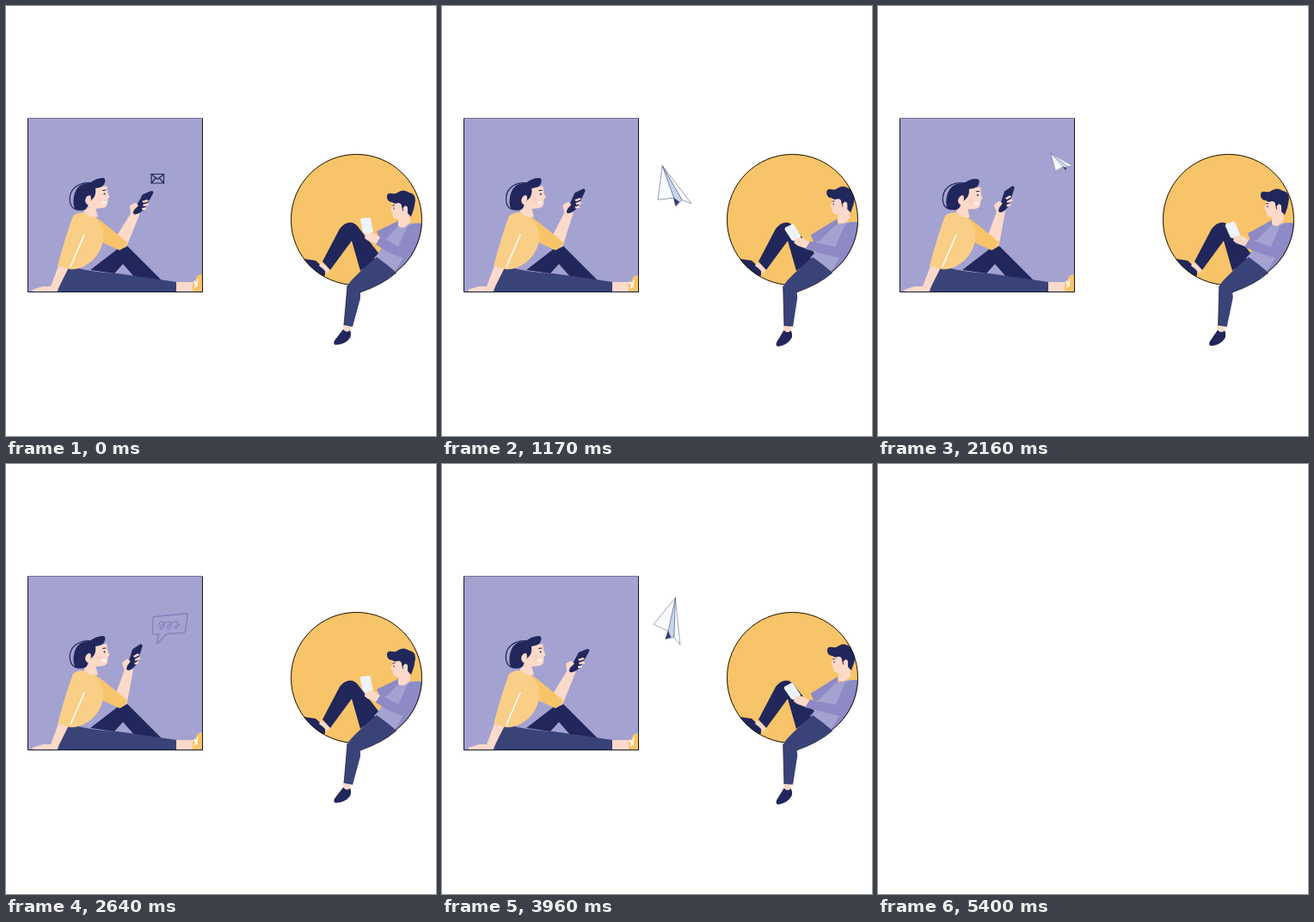
An HTML page for the animation above (5.43 s loop, 500x500 px).

```html
<!DOCTYPE html>
<html lang="en">
<head>
<meta charset="utf-8">
<title>Messages</title>
<style>
  html, body { margin: 0; width: 100%; height: 100%; overflow: hidden; background: #fff; }
  svg { display: block; width: 100%; height: 100%; }
  .navy { fill: #21275b; }
  .denim { fill: #3a4378; }
  .skin { fill: #fcd9c9; }
  .lilac { fill: #a4a2d1; }
  .violet { fill: #8d8ac5; }
  .amber { fill: #f8c469; }
  .peach { fill: #f9cf87; }
  .line { fill: none; stroke: #21275b; stroke-linecap: round; stroke-linejoin: round; }
  .white { stroke: #fff; }
</style>
</head>
<body>
<svg viewBox="0 0 500 500">
  <defs>
    <clipPath id="disc"><circle cx="407.5" cy="248.5" r="76.5"/></clipPath>
    <clipPath id="panel"><rect x="25" y="130" width="204" height="203"/></clipPath>
  </defs>
  <g id="scene">
    <g id="woman" clip-path="url(#panel)">
      <rect class="lilac" x="25" y="130" width="204" height="203"/>
      <g id="mail" class="line" stroke-width="1.2">
        <path d="M169 195.500H183.500V206H169ZL176.200 201.500 183.500 195.500M169 206 174.200 200M183.500 206 178.200 200"/>
      </g>
      <g id="bubble" class="line" style="stroke:#8482bd" stroke-width="1.500">
        <path d="M172.500 177.500 209.500 174Q211.500 174 211 176L208.500 194Q208 196 206 196.300L187 197.500 175.500 209 177.500 198 172 197.700Q170 197.500 170.300 195.500L171 179.500Q171 177.700 172.500 177.500Z"/>
        <path stroke-width="1.200" d="M177 187C181 180 186 184 183 190C180 195 177 190 182 187C190 181 194 183 191 190C188 195 186 188 191 186C198 181 203 184 199 190C196 194 195 187 202 187"/>
      </g>
      <path class="navy" d="M98 307 133 280Q138 276 142 280L182 320 150 316 136 300 126 311Z"/>
      <path class="denim" d="M75 302Q92 309 130 311L199 321V333H60Q64 313 75 302Z"/>
      <path class="skin" d="M198 321H219V333H198Z"/>
      <g id="shoe">
        <path class="amber" d="M217 333V323Q220 322 221 317 222 312 229 312H232V333Z"/>
        <path class="line white" stroke-width="1.300" d="M219 320Q222 323 219.500 327M223 318Q221 323 222.500 326"/>
      </g>
      <path class="skin" d="M61 302 52 326 43 326 30 330 32 332H59L73 304Z"/>
      <g id="forearm">
        <path class="skin" d="M126 272 145 241 144 232 150 229 156 238 155 243 140 280 132 283Z"/>
        <path class="navy" d="M148 239 159 219 169 215Q172 215 171 218L161 236Q154 243 149 242 147 241 148 239Z"/>
        <path class="skin" d="M146 231 151 229 154 232 150 236ZM158 227 164 225 166 227 160 229ZM159 231 165 229 166 232 160 233ZM158 235 163 234 163 237 158 237Z"/>
      </g>
      <path class="amber" d="M100 243Q108 247 141 275 139 281 132 284L110 274 98 258Z"/>
      <path class="peach" d="M78 244Q87 237 99 242 115 255 113 272 110 290 95 300 85 307 74 306L60 302Q70 265 78 244Z"/>
      <path class="line white" stroke-width="1.500" d="M91 266 75 303"/>
      <g id="womanHead">
        <path class="skin" d="M92 234 91 240Q98 247 107 245L104 235Z"/>
        <path class="skin" d="M100 212 117 209 118.500 218 120.500 222 118.500 224 118 231Q116 235 110 235L102 236 93 233Z"/>
        <path class="navy" d="M79 221Q82 206 97 206 106 199 114 200 117 203 113 209 109 212 104 212 105 220 101 224 97 227 94 235 91 239 81 237 77 232 79 221Z"/>
        <path class="line" stroke-width="1.200" d="M102 206Q88 204 80 211 73 217 74.500 228 76 237 85 237"/>
        <path class="skin" d="M92 226Q93 220 98 220 100 225 97 231 93 232 92 226Z"/>
        <path class="line" stroke-width="1" d="M112.500 214.500 116 214"/>
        <circle id="eye" class="navy" cx="114.500" cy="218.500" r="1"/>
        <path id="lid" class="line" stroke-width="1" d="M112.500 218.500H116.500"/>
        <circle cx="108" cy="225" r="2.400" fill="#f9bfb2" opacity=".4"/>
        <path fill="#fff" d="M110.500 227 116.500 227.500Q115 231 112 229.500Z"/>
      </g>
    </g>
    <g fill="none" stroke="#15152b">
      <path stroke-width="1" d="M25.500 130V332.500H228.500V130"/>
      <path stroke-width="1" stroke="#77768f" d="M25 130.500H229"/>
    </g>

    <circle class="amber" cx="407.500" cy="248.500" r="76.500"/>
    <g clip-path="url(#disc)">
      <path class="navy" d="M346 294 360 296 371 306 371 313 367 317 346 300Z"/>
      <path class="skin" d="M366 298 378 305 374 311 369 306 364 302Z"/>
      <path class="navy" d="M368 297 388 259Q395 250 403 252 408 254 411 259L436 291 412 308 402 273 377 307Z"/>
      <path id="farSleeve" class="violet"/>
      <path id="torso" class="lilac"/>
      <g id="manHead">
        <path class="skin" d="M456 243 456 256Q463 261 470 251L469 238Z"/>
        <path class="skin" d="M450 225 449 233 447 238 449 239 450 245Q453 249 460 247L468 241 466 226Z"/>
        <path class="navy" d="M443 223Q442 217 449 218 453 219 455 217 462 212 469 217 476 218 476 226 475 236 471 245L467 241Q468 233 464 232L461.500 239 460 233Q460 229 456 229 451 231 449 228 444 228 443 223Z"/>
        <path class="skin" d="M461.500 235Q464 231 467 234 467 240 463 241Z"/>
        <path class="line" stroke-width=".9" d="M449.500 232 452 231.500M451 234.500V236"/>
      </g>
      <path class="skin" id="farHand" d="M416 264 424 262 427 268 420 271Z"/>
      <g id="tablet">
        <path fill="#edf4fc" d="M413 247 422 246Q424 246 424 248L427 263 418 265Q416 265 415 263L412 249Z"/>
      </g>
      <path id="nearHand" class="skin" d="M418 265 427 264 435 269 432 277 421 273 417 270Z"/>
      <path id="sleeve" class="violet"/>
    </g>
    <circle cx="407.500" cy="248.500" r="76" fill="none" stroke="#1b160d" stroke-width="1"/>
    <path class="denim" d="M431 292Q444 301 454 310 438 324 412 333L397 326Q398 320 431 292Z"/>
    <g id="shin">
      <path class="skin" d="M392 369H402L399 382 392 381Z"/>
      <path class="navy" d="M392 376Q396 381 400 377 402 381 400 386 394 394 383 394 380 393 382 389Z"/>
      <path class="denim" d="M397 325 393 371 403 373 412 340V328Z"/>
      <path fill="none" stroke="#15152b" stroke-width=".7" d="M397 325 393 371"/>
    </g>
    <path fill="none" stroke="#15152b" stroke-width=".7" d="M412 333Q438 324 454 310"/>

    <g id="plane" stroke="#4a4e78" stroke-width=".5" stroke-linejoin="round">
      <path fill="#c5d7ef" d="M0 0-8 38-11 48-1 46Z"/>
      <path fill="#35396a" d="M-8 39-11 48-5 46Z"/>
      <path fill="#f8fafd" d="M0 0-25 31-8 39Z"/>
      <path fill="#fdfdff" d="M0 0-1 46 6 55Z"/>
    </g>
  </g>
</svg>
<script>
const LOOP = 5430, BLANK = 5400, BEAT = 2700;
const el = id => document.getElementById(id);
const set = (id, value) => el(id).setAttribute('transform', value);
const shape = (id, d) => el(id).setAttribute('d', d);
const clamp = x => Math.max(0, Math.min(1, x));
const smooth = x => { x = clamp(x); return x * x * (3 - 2 * x); };
const ramp = (t, from, to) => smooth((t - from) / (to - from));
const mix = (a, b, k) => a + (b - a) * k;

// Man: time, head x/y, tablet x/y/turn, hand x/y, shin turn
const poses = [
  [0, 0, 0, 0, 0, 0, 0, 0, 0],
  [600, -10, 0, 0, -9, 4, -2, -6, -6.5],
  [1260, 5, -5, -12, 9, -22, -8, 6, -6.5],
  [1680, 4, -5, -12, 9, -22, -8, 6, -6.5],
  [2130, 2, -2, -7, 5, -12, -4, 3, -3.5],
  [2700, 0, 0, 0, 0, 0, 0, 0, 0]
];

// Flight: start time, end time, Bezier points
const flight = [
  [700, 1260, [405, 250], [350, 264], [250, 252], [266, 184]],
  [1260, 1680, [266, 184], [283, 111], [395, 126], [360, 191]],
  [1680, 2130, [360, 191], [327, 254], [262, 258], [218, 191]],
  [2130, 2330, [218, 191], [204, 170], [190, 164], [174, 172]]
];

function poseAt(t) {
  const i = poses.findIndex(p => p[0] > t);
  const a = poses[i - 1], b = poses[i];
  const k = ramp(t, a[0], b[0]);
  return a.map((v, n) => mix(v, b[n], k)).slice(1);
}

function drawPlane(t) {
  const leg = flight.find(f => t >= f[0] && t < f[1]);
  el('plane').style.display = leg ? '' : 'none';
  if (!leg) return;
  const [from, to, a, b, c, d] = leg;
  const u = (t - from) / (to - from), v = 1 - u;
  const [x, y] = [0, 1].map(n => v*v*v*a[n] + 3*v*v*u*b[n] + 3*v*u*u*c[n] + u*u*u*d[n]);
  const [dx, dy] = [0, 1].map(n => v*v*(b[n]-a[n]) + 2*v*u*(c[n]-b[n]) + u*u*(d[n]-c[n]));
  const turn = Math.atan2(dy, dx) * 180 / Math.PI + 77;
  const shrink = t < 2130 ? mix(1, .62, ramp(t, 1850, 2130)) : .62 * (1 - u);
  const size = ramp(t, 700, 1050) * shrink;
  set('plane', `translate(${x} ${y}) rotate(${turn}) scale(${size}) translate(5 -28)`);
}

function drawMan(t) {
  const [hx, hy, tx, ty, tr, ax, ay, leg] = poseAt(t);
  const sx = hx * .35, sy = hy * .3;
  const wristX = 431 + ax * .3, wristY = 262 + ay * .8;
  set('manHead', `translate(${hx} ${hy})`);
  set('tablet', `translate(${tx} ${ty}) rotate(${tr} 419 256)`);
  set('farHand', `translate(${ax} ${ay})`);
  set('nearHand', `translate(${ax} ${ay})`);
  set('shin', `rotate(${leg} 404 328)`);
  shape('farSleeve', `M${458 + sx} ${249 + sy}L${wristX} ${wristY}L${wristX + 4} ${wristY + 9}L462 270Z`);
  shape('torso',
    `M${455 + sx} ${257 + sy}Q${467 + sx} ${251 + sy} ${490 + sx} ${253 + sy}V300L455 320L428 293` +
    `Q438 283 ${440 + ax * .3} ${273 + ay * .3}Z`);
  shape('sleeve',
    `M${436 + ax} ${268 + ay}L${430 + ax} ${277 + ay}Q446 289 462 293L452 309Q474 305 ${484 + sx} 283` +
    `L${487 + sx} ${255 + sy}Q${476 + sx} ${250 + sy} ${467 + sx} ${256 + sy}L${456 + sx} 280Z`);
}

function drawWoman(t) {
  const nod = 2.2 * (1 - Math.cos(2 * Math.PI * t / 1350));
  const raise = ramp(t, 1000, 1400) - ramp(t, 3150, 3550);
  const blink = Math.abs(t % BEAT - 600) < 75;
  set('womanHead', `rotate(${nod} 95 240)`);
  set('forearm', `translate(0 ${1.5 * raise}) rotate(${-11.5 * raise} 128 276)`);
  set('shoe', `translate(0 ${ramp(t % BEAT, 200, 600) - ramp(t % BEAT, 1260, 1600)})`);
  el('eye').style.display = blink ? 'none' : '';
  el('lid').style.display = blink ? '' : 'none';
  el('mail').style.opacity = 1 - ramp(t, 200, 450) + ramp(t, 4500, 4700);
  el('bubble').style.opacity = ramp(t, 2250, 2500) - ramp(t, 2850, 3150);
}

function draw(t) {
  el('scene').style.display = t < BLANK ? '' : 'none';
  drawWoman(t);
  drawMan(t % BEAT);
  drawPlane(t % BEAT);
}

const start = performance.now();
function tick() {
  draw((performance.now() - start) % LOOP);
  requestAnimationFrame(tick);
}
tick();
</script>
</body>
</html>
```
